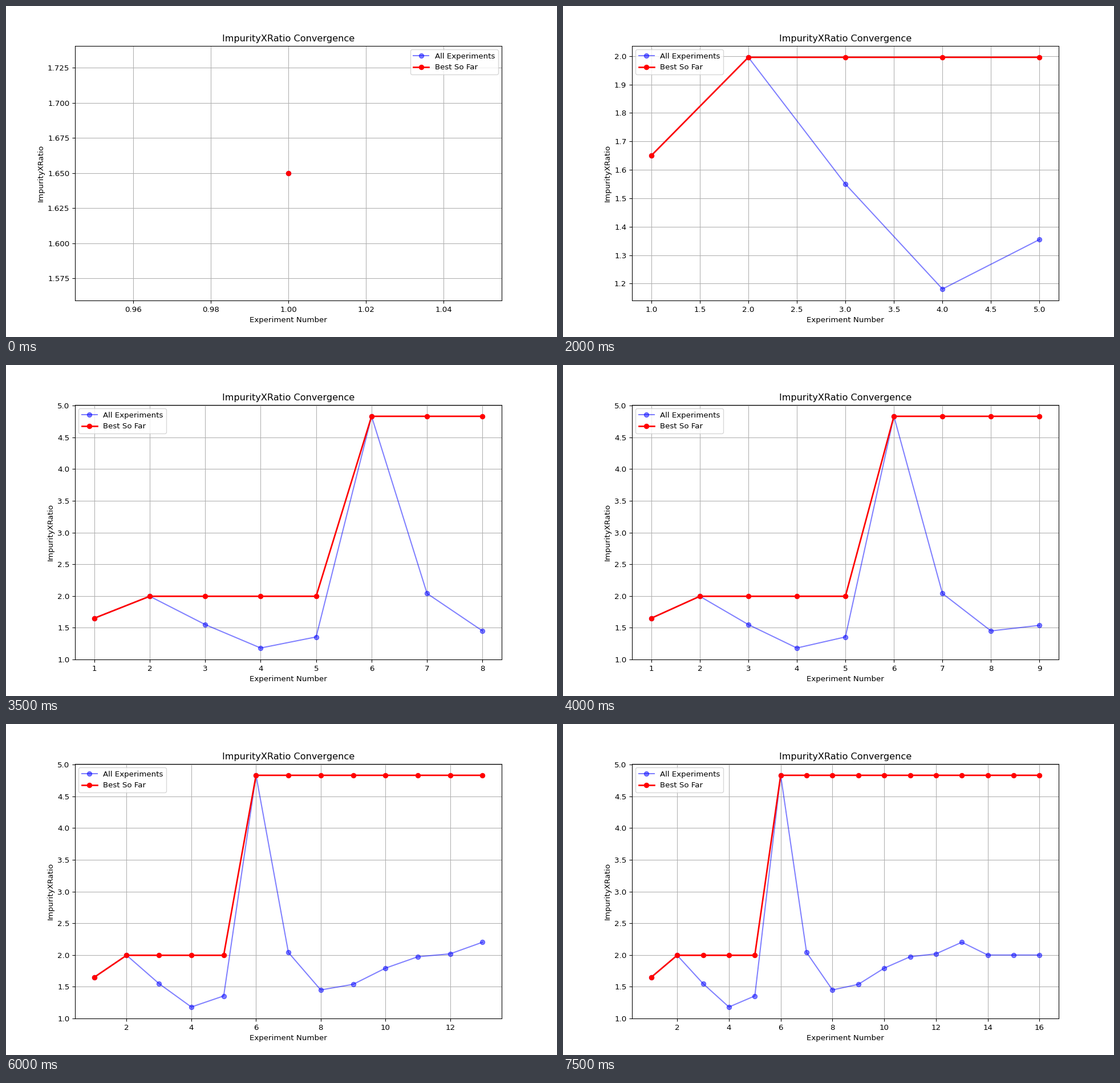
Write a matplotlib script that moves like this. It is 966 px wide and 580 px high and loops after 8 s.

```python
import numpy as np
import matplotlib.pyplot as plt
from matplotlib.animation import FuncAnimation

METRIC = "ImpurityXRatio"
DPI = 96.6

# A scattered start with one peak, a wavy climb, then a plateau.
start = [1.65, 1.9956, 1.55, 1.181, 1.355, 4.83, 2.04]
k = np.arange(6)
climb = 1.45 + 0.156 * k - 0.07 * np.sin(1.8 * k)
plateau = np.full(3, 2.0)

values = np.concatenate([start, climb, plateau])
best = np.maximum.accumulate(values)
trials = np.arange(1, len(values) + 1)

fig, ax = plt.subplots(figsize=(966 / DPI, 580 / DPI), dpi=DPI)


def update(i):
    """Plot the first i + 1 experiments on freshly scaled axes."""
    n = i + 1
    ax.clear()
    ax.plot(trials[:n], values[:n], "bo-", alpha=0.5, label="All Experiments")
    ax.plot(trials[:n], best[:n], "ro-", linewidth=2, label="Best So Far")
    ax.set_xlabel("Experiment Number")
    ax.set_ylabel(METRIC)
    ax.set_title(f"{METRIC} Convergence")
    ax.grid(True)
    ax.legend()
    return ax.get_children()


anim = FuncAnimation(fig, update, frames=len(values), interval=500,
                     repeat=True, repeat_delay=0, blit=False)
plt.show()
```
